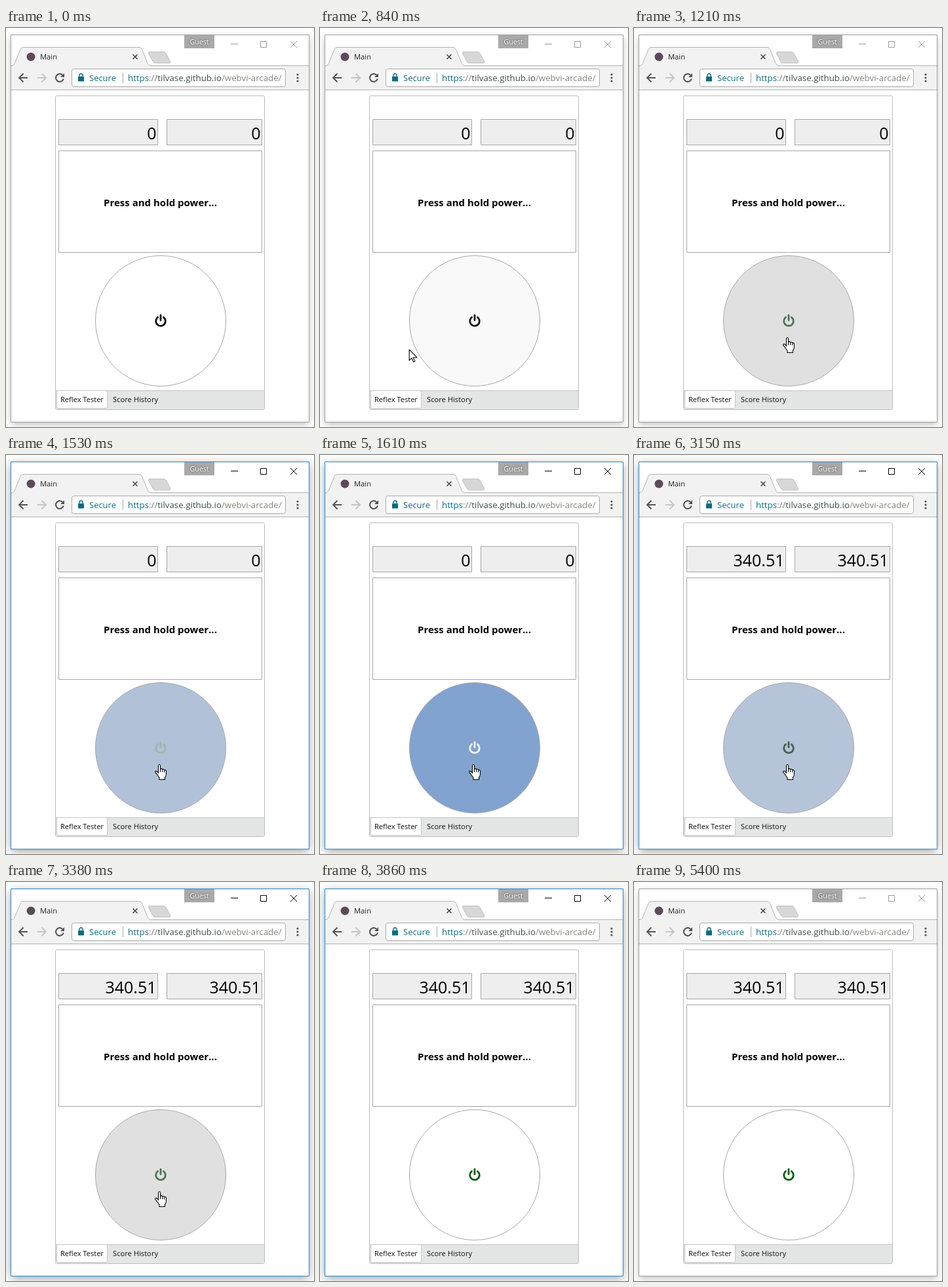
Recreate the animation shown at these times as an HTML page with a canvas. Size 470 by 609 pixels, loop 5570 ms.

```html
<!DOCTYPE html>
<html lang="en">
<head>
<meta charset="utf-8">
<title>Reflex Tester</title>
<style>
html, body { margin: 0; width: 100%; height: 100%; overflow: hidden; background: #fff; }
canvas { display: block; }
</style>
</head>
<body>
<canvas id="stage" width="470" height="609"></canvas>
<script>
const ctx = document.getElementById('stage').getContext('2d');
const LOOP = 5570;
const SANS = '"Open Sans", "Noto Sans", sans-serif';

const HAND = new Path2D('M5.5 13.5V2.5Q5.5.5 7 .5T8.5 2.5V8Q8.8 6.6 10 6.6T11.6 8.4Q12 7.4 13.1 7.5T14.6 9.2Q15 8.3 16.1 8.6T17.5 10.5V15Q17.5 18 15.5 20V23.5H7V20.5Q5 18 3 14.8L1 12.7Q.1 11.2 1.3 10.5 2.8 10 4 11.5Z');
const KNUCKLES = new Path2D('M8.5 8V12M11.6 8.4V12M14.6 9.2V12.5');
const ARROW = new Path2D('M.5.5V17L4.3 13.4 7 19.5 9.3 18.5 6.7 12.6H12.3Z');

// Each fade is held in equal steps: start, end, steps, ease power, circle from/to, icon from/to.
const FADES = [
  [820, 1130, 5, 1, [255, 255, 255], [224, 224, 224], [0, 0, 0], [82, 112, 90]],
  [1530, 1610, 2, 1, [224, 224, 224], [130, 162, 208], [82, 112, 90], [246, 248, 251]],
  [3080, 3380, 5, 3.5, [130, 162, 208], [224, 224, 224], [70, 70, 70], [82, 112, 90]],
  [3700, 3860, 3, 1, [224, 224, 224], [255, 255, 255], [82, 112, 90], [8, 92, 20]]
];

const lerp = (a, b, u) => a + (b - a) * u;
const mix = (a, b, u) => `rgb(${a.map((v, i) => Math.round(lerp(v, b[i], u)))})`;

function stepIndex(t, start, end, steps) {
  const i = Math.floor((t - start) / (end - start) * (steps - 1) + 0.05);
  return Math.max(-1, Math.min(steps - 1, i));
}

function text(str, x, y, size, color = '#000', align = 'left', weight = 400) {
  ctx.font = `${weight} ${size}px ${SANS}`;
  ctx.textAlign = align;
  ctx.fillStyle = color;
  ctx.fillText(str, x, y);
}

function rect(x, y, w, h, fill, stroke, radius = 0) {
  ctx.beginPath();
  ctx.roundRect(x, y, w, h, radius);
  paint(fill, stroke);
}

function paint(fill, stroke, width = 1) {
  if (fill) { ctx.fillStyle = fill; ctx.fill(); }
  if (stroke) { ctx.strokeStyle = stroke; ctx.lineWidth = width; ctx.stroke(); }
}

function path(d, fill, stroke, width = 1) {
  const p = new Path2D(d);
  if (fill) { ctx.fillStyle = fill; ctx.fill(p); }
  if (stroke) { ctx.strokeStyle = stroke; ctx.lineWidth = width; ctx.stroke(p); }
}

function disc(x, y, r, fill, stroke) {
  ctx.beginPath();
  ctx.arc(x, y, r, 0, Math.PI * 2);
  paint(fill, stroke);
}

function drawWindow(active) {
  ctx.fillStyle = '#fff';
  ctx.fillRect(0, 0, 470, 609);
  ctx.save();
  ctx.shadowColor = active ? 'rgba(0,0,0,.42)' : 'rgba(0,0,0,.3)';
  ctx.shadowBlur = active ? 13 : 10;
  ctx.shadowOffsetY = 3;
  rect(8, 11, 454, 590, '#fff');
  ctx.restore();
  rect(7.5, 10.5, 455, 591, '#fff', active ? '#2b87c8' : '#a2a2a2');

  rect(272, 11, 46, 20, '#a9a9a9');
  ctx.save();
  ctx.shadowColor = '#444';
  ctx.shadowBlur = 3;
  text('Guest', 295, 25, 10.7, '#fff', 'center');
  ctx.restore();

  const ink = active ? '#000' : '#999';
  path('M343 24.5H354M388.5 20.5H397.5V29.5H388.5ZM434 20L444 30M444 20L434 30', null, ink);
}

function drawTabStrip() {
  rect(8, 58, 454, 36, '#f2f2f2');
  path('M8 57.5H9Q12 57 13 54.5L22 32.5Q23.3 29.5 26 29.5H203Q206 29.5 207.5 32.5L216.5 54.5Q217.7 57.5 221 57.5V59H8Z', '#f2f2f2');
  path('M8 57.5H9Q12 57 13 54.5L22 32.5Q23.3 29.5 26 29.5H203Q206 29.5 207.5 32.5L216.5 54.5Q217.7 57.5 221 57.5H462M8 94.5H462', null, '#b3b3b3');
  path('M219 36.5H240.5Q243 36.5 244 38.5L250.5 50.5Q251.7 53.5 249 53.5H227.5Q225 53.5 224 51L217.5 39Q216.5 36.5 219 36.5Z', '#d7d7d7', '#c2c2c2');
  disc(38, 44, 6.5, '#5c4a5b');
  text('Main', 52, 48, 11.2, '#222');
  path('M193.5 40.5L200.5 47.5M200.5 40.5L193.5 47.5', null, '#484848', 1.6);
}

function drawToolbar() {
  path('M33 76H20.5M26.5 69.5L20 76L26.5 82.5', null, '#555', 2);
  path('M48 76H60.5M54.5 69.5L61 76L54.5 82.5', null, '#c6c6c6', 2);
  ctx.beginPath();
  ctx.arc(82, 76, 6, 0.25, 5.5);
  paint(null, '#505050', 2);
  path('M89 69V75H83Z', '#505050');

  rect(100.5, 62.5, 326, 27, '#fff', '#a9a9a9', 3);
  rect(110, 74, 9, 7.5, '#0c6c80', null, 1);
  path('M111.8 74V72.5A2.7 2.7 0 0 1 117.2 72.5V74', null, '#0c6c80', 1.4);
  text('Secure', 127, 81, 13, '#0c6c80');
  path('M178.5 68V84', null, '#aaa');

  let x = 186;
  const parts = [['https', '#0c6c80'], ['://', '#777'], ['tilvase.github.io', '#3d4b4b'], ['/webvi-arcade/', '#85857a']];
  for (const [str, color] of parts) {
    text(str, x, 81, 13.3, color);
    x += ctx.measureText(str).width;
  }
  for (const y of [71, 76, 81]) disc(445, y, 1.6, '#505050');
}

function drawPanel(score, release) {
  rect(75.5, 103.5, 319, 479, '#fff', '#bcbcbc', 2);
  rect(80.5, 139.5, 151, 39, '#eee', '#a6a6a6');
  rect(245.5, 139.5, 145, 39, '#eee', '#a6a6a6');
  text(score, 229.5, 170, 25, '#000', 'right');
  text(score, 388.5, 170, 25, '#000', 'right');

  rect(80.5, 187.5, 310, 155, '#fff', '#a6a6a6');
  if (release) {
    rect(93, 200, 285, 130, '#b499d9');
    text('RELEASE POWER NOW!', 235.5, 272, 15.6, '#000', 'center', 700);
  } else {
    text('Press and hold power...', 235.5, 272, 15, '#000', 'center', 700);
  }

  rect(76, 553, 318, 29, '#e4e6e6');
  path('M76 553.5H394', null, '#c3c5c5');
  rect(77.5, 553.5, 77, 27, '#fff', '#c3c5c5', 2);
  text('Reflex Tester', 83, 571, 11.1, '#111');
  text('Score History', 163, 571, 11.2, '#111');
}

function drawPower(t) {
  let circle = '#fff', icon = '#000';
  for (const [start, end, steps, power, c0, c1, i0, i1] of FADES) {
    const i = stepIndex(t, start, end, steps);
    if (i < 0) break;
    const u = 1 - Math.pow(1 - (i + 1) / steps, power);
    circle = mix(c0, c1, u);
    icon = mix(i0, i1, u);
  }
  disc(236, 447, 99.5, circle, '#a8a8a8');
  ctx.lineCap = 'round';
  ctx.beginPath();
  ctx.arc(236, 447.4, 7.3, -0.92, Math.PI + 0.92);
  ctx.moveTo(236, 438.5);
  ctx.lineTo(236, 446);
  paint(null, icon, 2.8);
  ctx.lineCap = 'butt';
}

function drawCursor(t) {
  if (t < 670 || t >= 3860) return;
  let x, y;
  if (t < 3700) {
    const u = stepIndex(t, 670, 1210, 8) / 7;
    const e = 1 - (1 - u) ** 2;
    x = lerp(48, 227, e);
    y = lerp(508, 472, e);
  } else {
    const u = (stepIndex(t, 3700, 3860, 3) + 1) / 2;
    x = lerp(227, 329, u);
    y = lerp(472, 592, u);
  }
  const over = Math.hypot(x + 7 - 236, y - 447) < 100;
  ctx.save();
  ctx.translate(x, y);
  ctx.lineJoin = 'round';
  ctx.lineWidth = 1.1;
  ctx.fillStyle = '#fff';
  ctx.strokeStyle = '#000';
  const shape = over ? HAND : ARROW;
  ctx.fill(shape);
  ctx.stroke(shape);
  if (over) ctx.stroke(KNUCKLES);
  ctx.restore();
}

function frame(now) {
  const t = now % LOOP;
  drawWindow(t >= 1530 && t < 5400);
  drawTabStrip();
  drawToolbar();
  drawPanel(t < 3080 ? '0' : '340.51', t >= 2770 && t < 3080);
  drawPower(t);
  drawCursor(t);
  requestAnimationFrame(frame);
}

const origin = performance.now();
const tick = () => frame(Math.max(0, performance.now() - origin));
requestAnimationFrame(function loop(now) {
  frame(Math.max(0, now));
});
</script>
</body>
</html>
```
